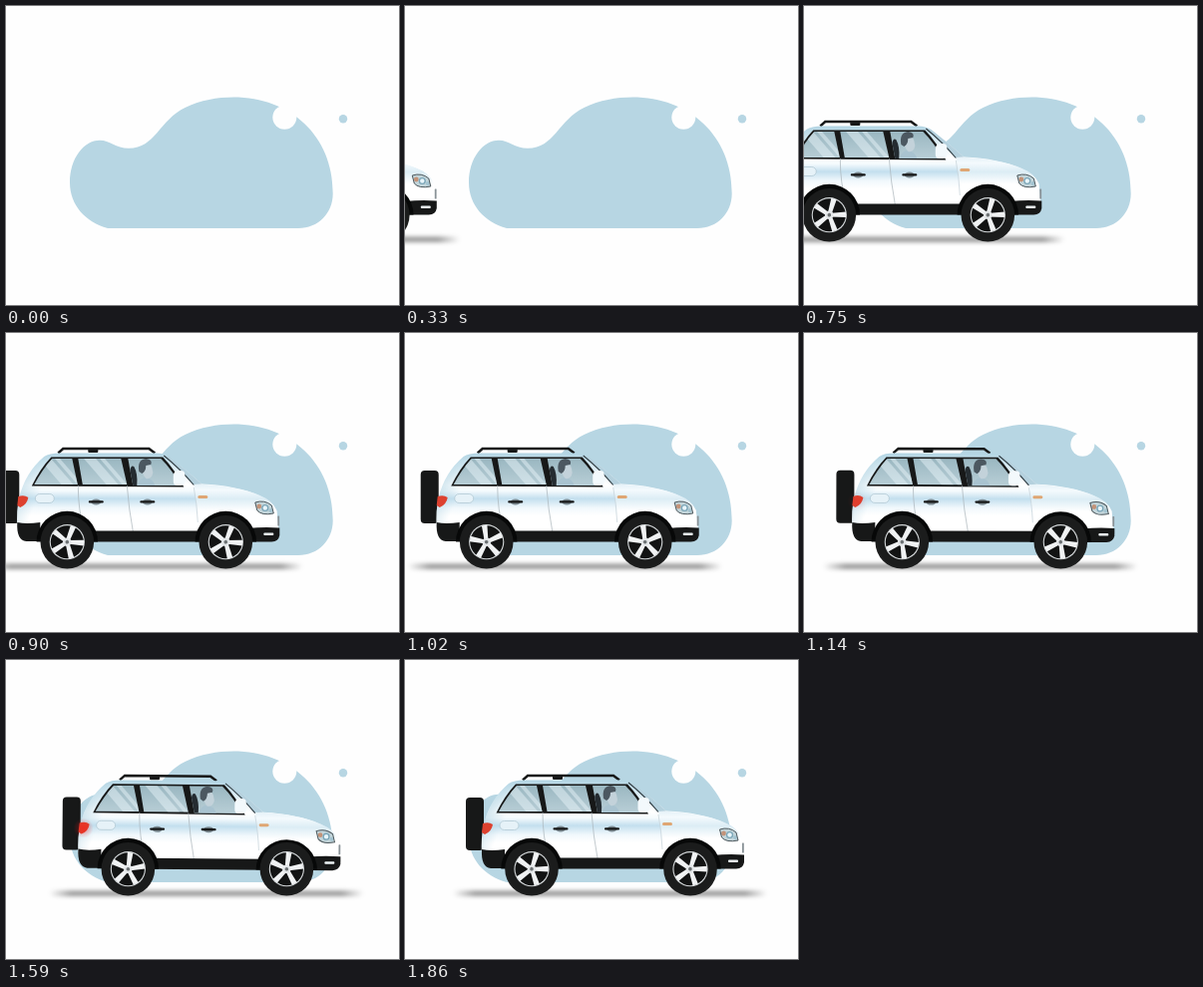
An HTML page with a canvas that plays this animation: 394 px wide and 300 px high, repeating every 2.67 s.

```html
<!DOCTYPE html>
<html lang="en">
<head>
<meta charset="utf-8">
<title>Car arriving</title>
<style>
html, body { margin: 0; width: 100%; height: 100%; overflow: hidden; background: #fefefe; }
canvas { display: block; width: 394px; height: 300px; }
</style>
</head>
<body>
<canvas id="stage" width="394" height="300"></canvas>
<script>
const ctx = document.getElementById('stage').getContext('2d');
const LOOP = 2670, STEP = 30, ENTER = 270;
const INK = '#171818', ARCH = '#070808', SKY = '#b7d6e3', PAPER = '#fefefe';
const WHEEL_RADIUS = 26.8, WHEEL_PHASE = 0.31;

// Time and remaining distance to the parking spot.
const travel = [[240, -366], [510, -198.7], [750, -101.7], [900, -65.7],
                [1140, -28.7], [1320, -14], [1380, -10.7], [1860, 0]];

function slope(i) {
  if (i === travel.length - 1) return 0;
  const a = travel[Math.max(0, i - 1)], b = travel[i + 1];
  return (b[1] - a[1]) / (b[0] - a[0]);
}

function offsetAt(t) {
  const last = travel.length - 1;
  if (t >= travel[last][0]) return 0;
  let i = 0;
  while (t > travel[i + 1][0]) i++;
  const [t0, x0] = travel[i], [t1, x1] = travel[i + 1];
  const h = t1 - t0, s = (t - t0) / h, r = 1 - s;
  return x0 * r * r * (1 + 2 * s) + x1 * s * s * (3 - 2 * s)
       + h * (slope(i) * s * r * r - slope(i + 1) * s * s * r);
}

// Nose dive while braking: 0..1
function brakeAt(t) {
  const s = (t - 1050) / 720;
  return s > 0 && s < 1 ? Math.sin(Math.PI * s) ** 2 : 0;
}

function fill(d, color) {
  ctx.fillStyle = color;
  ctx.fill(new Path2D(d));
}

function line(d, color, width) {
  ctx.strokeStyle = color;
  ctx.lineWidth = width;
  ctx.stroke(new Path2D(d));
}

function disc(x, y, r, color, ry = r) {
  ctx.fillStyle = color;
  ctx.beginPath();
  ctx.ellipse(x, y, r, ry, 0, 0, Math.PI * 2);
  ctx.fill();
}

function box(x, y, w, h, r, color) {
  ctx.fillStyle = color;
  ctx.beginPath();
  ctx.roundRect(x, y, w, h, r);
  ctx.fill();
}

function gradient(x0, y0, x1, y1, ...stops) {
  const g = ctx.createLinearGradient(x0, y0, x1, y1);
  stops.forEach(([at, color]) => g.addColorStop(at, color));
  return g;
}

function drawBackdrop() {
  ctx.fillStyle = PAPER;
  ctx.fillRect(0, 0, 394, 300);
  fill('M102 223C80 217 64 200 64 177C64 153 78 134.7 94 134.7C104 134.7 110 142.7 123 142.7' +
       'C150 142.7 153 114.7 180 101.7C195 94.7 212 91.6 228 91.6C285 91.6 327.7 130 327.7 188' +
       'C327.7 208 313 223 293 223Z', SKY);
  disc(279.3, 111.7, 12, PAPER);
  disc(338, 113.3, 4.2, SKY);
}

function drawShadow() {
  ctx.save();
  ctx.filter = 'blur(2px)';
  ctx.fillStyle = gradient(48, 0, 363, 0, [0, 'rgba(0,0,0,0)'], [0.07, 'rgba(0,0,0,.4)'],
    [0.93, 'rgba(0,0,0,.4)'], [1, 'rgba(0,0,0,0)']);
  ctx.fillRect(48, 231.5, 315, 5.5);
  ctx.restore();
}

function drawDriver() {
  fill('M190 153L190 138Q191 132 194 134Q198 141 197 153Z', '#252c31');
  fill('M198 153Q199 145 206 145Q213 146 215 153Z', '#a9c3d0');
  fill('M202 132Q210 129 212 135L213 140Q212 147 206 146Q201 141 202 132Z', '#c3d2da');
  fill('M199 139Q197 127 206 126Q213 127 211 132L206 133Q206 139 202 141Z', '#4c5861');
}

function drawWindows() {
  const panes = ['M94 152Q102 137 112 126H132L137.5 152Z',
                 'M138 126H181L187 152H142.5Z',
                 'M188 126H221Q232 137 241 153H193Z'];
  fill('M91.5 153.5Q100 136 111 124.5H223Q235 137 244 154.5Z', INK);
  const glass = gradient(0, 126, 0, 153, [0, '#9ab7c1'], [1, '#b8ced6']);
  panes.forEach((pane, i) => {
    fill(pane, glass);
    ctx.save();
    ctx.clip(new Path2D(pane));
    if (i < 2) {
      const x = i ? 137 : 92;
      fill(`M${x + 5} 124h12l26 30h-12Z`, 'rgba(235,246,250,.45)');
      fill(`M${x + 21} 124h5l26 30h-5Z`, 'rgba(235,246,250,.45)');
    } else {
      drawDriver();
    }
    ctx.restore();
  });
}

function drawHandle(x) {
  disc(x, 169.5, 5, '#7b8990', 3);
  box(x - 7.5, 168.2, 15, 2.3, 1.1, INK);
}

function drawLamps(brake) {
  fill('M78 164Q84 162 88 165Q87 172 80 175L77 173Z', '#dd412f');
  if (brake > 0) {
    const glow = ctx.createRadialGradient(82, 169, 0, 82, 169, 10);
    glow.addColorStop(0, `rgba(255,20,20,${0.85 * brake})`);
    glow.addColorStop(1, 'rgba(255,20,20,0)');
    disc(82, 169, 10, glow);
  }
  const lamp = 'M315.5 170Q325 167 332 173L334 181Q322 183.5 317.5 178Z';
  fill(lamp, '#c3d5da');
  disc(319.5, 174, 2.4, '#c39379');
  disc(325.5, 175.5, 3.6, '#7ba6b8');
  disc(325.5, 175.5, 2.2, '#e8f5fa');
  disc(331, 178, 2, '#a3c4d1');
  line(lamp, '#4b565b', 1);
  box(258, 163, 10, 3, 1.5, '#dfa673');
}

function drawBody(brake) {
  box(61, 138, 18, 53, 4, INK);
  line('M118 120.5L123 116H209L215 120.5', INK, 2.4);
  box(148, 115, 10, 5, 1, INK);

  const shell = 'M77 196Q76 177 79 165Q85 140 104 124Q109 120.5 120 120.5H216Q224 120.5 229 124' +
                'Q246 137 262 151.5Q297 153 320 163Q333 168 337 178L339 197L320 208H85Z';
  fill(shell, gradient(0, 120, 0, 197, [0, '#b0d3e2'], [0.15, '#d3e8f1'], [0.42, '#ffffff'],
    [0.5, '#f4fafd'], [0.6, '#c3dfee'], [0.72, '#f1f8fc'], [0.82, '#ffffff']));
  fill(shell, gradient(80, 140, 104, 150, [0, 'rgba(176,211,226,.75)'], [1, 'rgba(176,211,226,0)']));
  fill('M254 151.5Q297 153 320 163Q333 168 337 178L339 197H262Q256 175 254 151.5Z',
    gradient(0, 152, 0, 190, [0, '#e6f2f8'], [0.15, '#f4fafd'], [0.38, '#dcedf5'], [0.7, '#ffffff']));
  fill('M224 123L229 124Q246 137 262 151.5L253 152Q240 136 224 123Z', '#b5d1de');
  line('M224 123Q240 136 254 152.5', '#333f45', 1.1);
  drawWindows();

  line('M138 153Q138 178 144 198', '#a9b4b9', 0.7);
  line('M187 153Q189 178 193 199', '#a9b4b9', 0.7);
  line('M254 155Q257 170 258 190', '#c3d0d7', 0.7);
  ctx.beginPath();
  ctx.roundRect(95, 161.5, 19, 9, 4.5);
  ctx.fillStyle = '#e6f2f8';
  ctx.fill();
  ctx.strokeStyle = '#b3cad5';
  ctx.lineWidth = 0.8;
  ctx.stroke();
  drawHandle(156);
  drawHandle(207.5);
  box(233.5, 138, 11.5, 15, [5, 4, 4, 4], '#f3f9fc');
  drawLamps(brake);

  fill('M77 190Q86 192 100 190V209H86Q76 208 77 190Z', INK);
  fill('M145 198.5H266V209.5H145Z', INK);
  fill('M308 196Q324 194.5 340 195.5V203Q339 209 332 209.5H308Z', INK);
  for (const x of [127, 286]) {
    ctx.fillStyle = ARCH;
    ctx.beginPath();
    ctx.arc(x, 209.5, 30.7, Math.PI, 0);
    ctx.fill();
  }
  box(324, 200.5, 10, 2.5, 1, '#edf3f5');
  box(338, 183.5, 1.8, 10, 0.5, '#899297');
}

function drawWheel(x, angle) {
  ctx.save();
  ctx.translate(x, 209.7);
  disc(0, 0, WHEEL_RADIUS, '#1b1c1c');
  disc(0, 0, 17.6, '#d4d8da');
  disc(0, 0, 16.5, '#121313');
  ctx.rotate(angle);
  for (let i = 0; i < 5; i++) {
    fill('M-1.8 0L-2.8 -16.8H2.8L1.8 0Z', '#f0f2f3');
    ctx.rotate(Math.PI * 0.4);
  }
  disc(0, 0, 4.3, '#e4e7e9');
  disc(0, 0, 1.8, '#6d7274');
  ctx.restore();
}

function drawCar(t) {
  const offset = offsetAt(t), brake = brakeAt(t);
  const spin = WHEEL_PHASE + offset / WHEEL_RADIUS;
  ctx.save();
  ctx.translate(offset, 0);
  drawShadow();
  ctx.save();
  ctx.translate(127, 198);
  ctx.rotate(0.017 * brake);
  ctx.translate(-127, -198);
  drawBody(brake);
  ctx.restore();
  drawWheel(127, spin);
  drawWheel(286, spin);
  ctx.restore();
}

const start = performance.now();

function render() {
  const elapsed = (performance.now() - start) % LOOP;
  const t = Math.floor(elapsed / STEP) * STEP;
  drawBackdrop();
  if (t >= ENTER) drawCar(t);
  requestAnimationFrame(render);
}

render();
</script>
</body>
</html>
```
